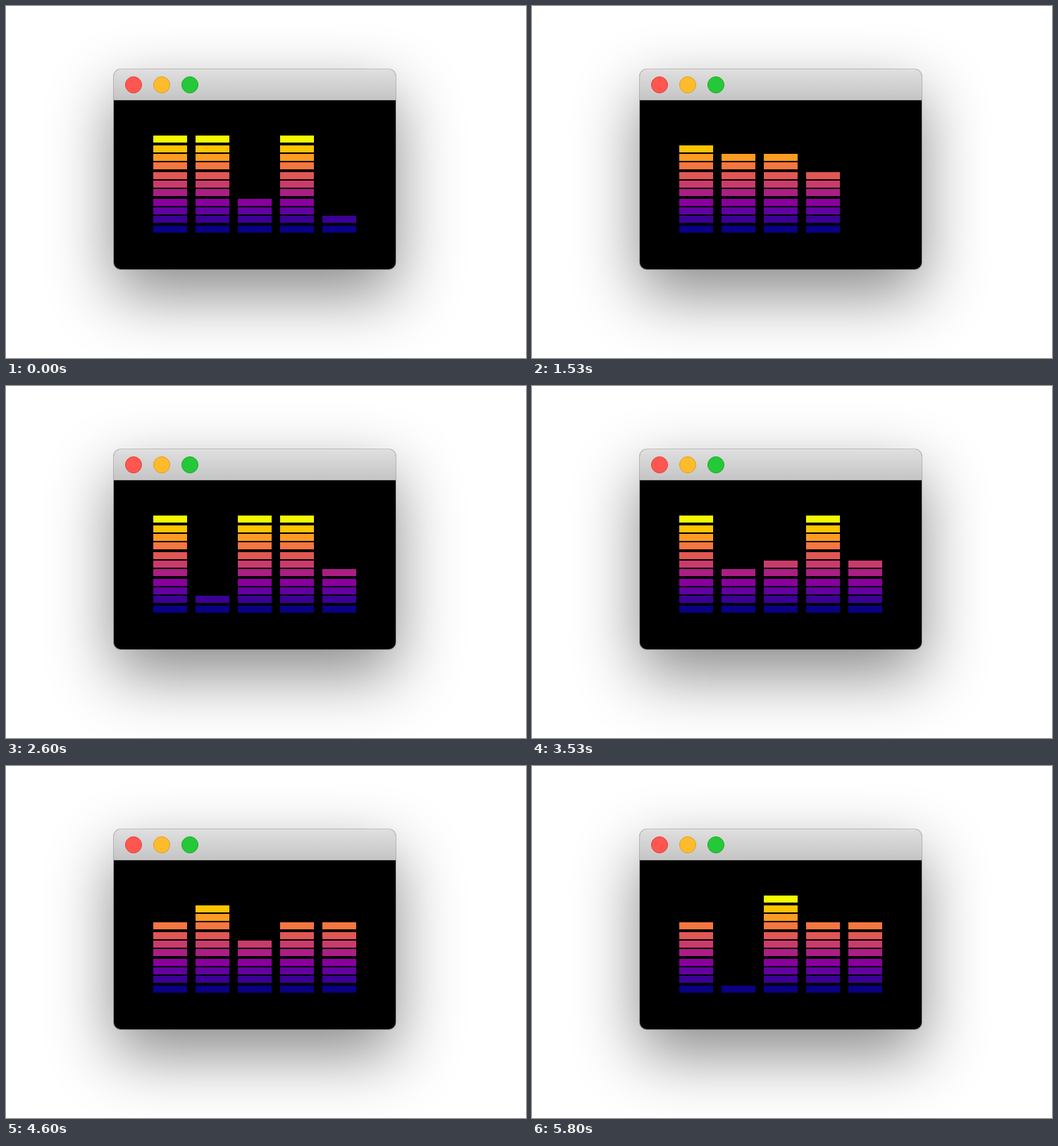
Recreate the animation shown at these times as an HTML page with a canvas. Size 738x500 px, loop 5.93 s.

```html
<!DOCTYPE html>
<html lang="en">
<head>
<meta charset="utf-8">
<title>Equalizer</title>
<style>
html, body { margin: 0; width: 100%; height: 100%; overflow: hidden; background: #fff; }
.window {
  position: absolute; left: 153px; top: 90px; width: 400px; height: 284px;
  border-radius: 10px; background: #000;
  box-shadow: 0 0 0 1px rgba(0, 0, 0, .22), 0 35px 92px rgba(0, 0, 0, .47);
}
.bar {
  height: 43px; border-radius: 10px 10px 0 0;
  background: linear-gradient(#dfdfdf, #c5c5c5);
  box-shadow: inset 0 1px #e6e6e6, 0 1px #a4a4a4;
}
.bar i {
  position: absolute; top: 10px; width: 24px; height: 24px;
  box-sizing: border-box; border-radius: 50%; border: 1px solid var(--edge);
}
.red { left: 16px; background: #ff5650; --edge: #e0443e; }
.amber { left: 56px; background: #febb2c; --edge: #dea123; }
.green { left: 96px; background: #24c838; --edge: #1aab29; }
canvas { position: absolute; left: 56px; top: 94px; }
</style>
</head>
<body>
<div class="window">
  <div class="bar"><i class="red"></i><i class="amber"></i><i class="green"></i></div>
  <canvas width="288" height="138"></canvas>
</div>
<script>
const LOOP = 5930, ROWS = 11, WOBBLE = 2.5;
const COLORS = ['#f2fa00', '#ffc400', '#ff9b22', '#f57640', '#e05755', '#c83c6c',
  '#ab1e84', '#8a009d', '#6200a0', '#3c0095', '#0a0082'];

// Each column drifts through its own heights, reached at the shared ticks.
const TICKS = [0, 7, 15, 26, 35, 46, 58];
const COLUMNS = [
  [11, 9, 10, 11, 11, 8, 8],
  [11, 9, 9, 2, 5, 10, 1],
  [4, 7, 9, 11, 6, 6, 11],
  [11, 7, 7, 11, 11, 8, 8],
  [2, 3, 0, 5, 6, 8, 8]
];

const ctx = document.querySelector('canvas').getContext('2d');

// Ticks alternate between 130 ms and 70 ms.
const tickAt = t => 2 * Math.floor(t / 200) + (t % 200 >= 130 ? 1 : 0);

// Eased drift plus a wobble that is zero at every key tick.
function level(col, tick) {
  const n = Math.max(1, TICKS.findIndex(k => k >= tick));
  const u = (tick - TICKS[n - 1]) / (TICKS[n] - TICKS[n - 1]);
  const from = COLUMNS[col][n - 1], to = COLUMNS[col][n];
  const drift = from + (to - from) * (1 - Math.cos(Math.PI * u)) / 2;
  const wobble = WOBBLE * Math.sin(2 * Math.PI * u * (1 + col % 2));
  return Math.min(ROWS, Math.max(0, Math.round(drift - wobble)));
}

function draw() {
  const tick = tickAt(performance.now() % LOOP);
  ctx.clearRect(0, 0, 288, 138);
  for (let col = 0; col < COLUMNS.length; col++) {
    for (let row = ROWS - level(col, tick); row < ROWS; row++) {
      ctx.fillStyle = COLORS[row];
      ctx.fillRect(col * 60, row * 12 + 2 * Math.ceil(row / 3), 48, 10);
    }
  }
  requestAnimationFrame(draw);
}
draw();
</script>
</body>
</html>
```
